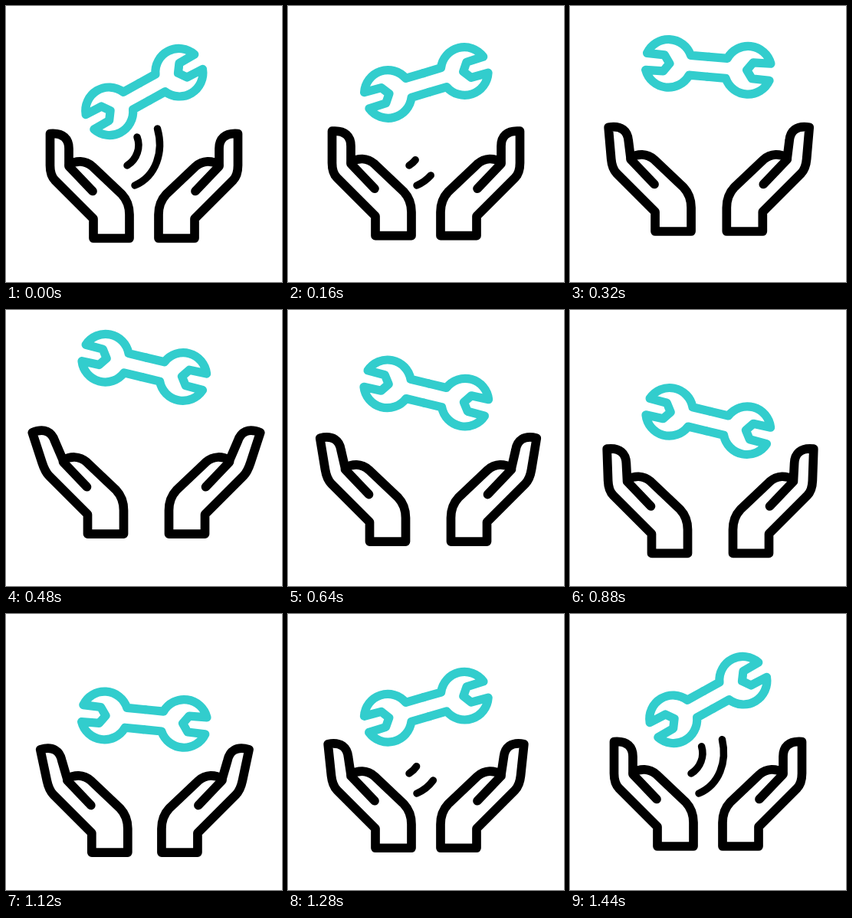
These frames come from a looping animation (360x360 px, 1.48 s). An HTML page:

```html
<!DOCTYPE html>
<html lang="en">
<head>
<meta charset="utf-8">
<title>Wrench and hands</title>
<style>
  html, body { margin: 0; width: 100%; height: 100%; overflow: hidden; background: #fff; }
  svg { display: block; width: 100%; height: 100%; fill: none; stroke: #000; stroke-width: 11.7; stroke-linecap: round; stroke-linejoin: round; }
  #wrench { stroke: #32cdcd; stroke-width: 11.2; }
  .swoosh { stroke-width: 9.5; }
</style>
</head>
<body>
<svg viewBox="0 0 360 360">
  <defs>
    <g id="hand">
      <path id="outline"/>
      <path d="M82 209L113 241.500"/>
    </g>
    <path id="half" d="M0-13H24A30.700 30.700 0 0 1 81-11L58-10.500 50.500 0 58 10.500 81 11A30.700 30.700 0 0 1 24 13H0"/>
  </defs>
  <use id="left" href="#hand"/>
  <use id="right" href="#hand"/>
  <path class="swoosh" pathLength="1" d="M158 208C171 200 176 184 171 171"/>
  <path class="swoosh" pathLength="1" d="M168 234C196 222 206 190 197.500 160"/>
  <g id="wrench">
    <use href="#half"/>
    <use href="#half" transform="rotate(180)"/>
  </g>
</svg>
<script>
const LOOP = 1480, STEP = 40;
const $ = id => document.getElementById(id);
const swooshes = document.querySelectorAll('.swoosh');

// Eased progress from 0 to 1 between two times.
function ease(t, from, to) {
  const u = Math.min(1, Math.max(0, (t - from) / (to - from)));
  return u * u * (3 - 2 * u);
}

// Hand outline; the finger turns about its knuckle by the given angle.
function outline(degrees) {
  const a = degrees * Math.PI / 180, cos = Math.cos(a), sin = Math.sin(a);
  const turn = (x, y) => {
    const dx = x - 63, dy = y - 218;
    return `${63 + dx * cos + dy * sin} ${218 + dy * cos - dx * sin} `;
  };
  return 'M' + turn(57.5, 166.5)
    + 'C' + turn(75, 165) + turn(82, 174) + turn(82, 186)
    + 'L82 207C91 201.5 103 200.5 113 209.5L151 245.5C158 253 161 262 161 272V303H114V277.5L64 227.5'
    + 'C59 222.5 ' + turn(57.5, 216) + turn(57.5, 208) + 'Z';
}

function draw(t) {
  const wrenchY = 112 - 40 * ease(t, 0, 440) + 73 * ease(t, 430, 850) - 33 * ease(t, 980, 1440);
  const angle = -29 + 42.5 * (ease(t, 0, 450) - ease(t, 1000, 1440));
  const handY = -11 * ease(t, 0, 440) + 25.5 * ease(t, 460, 880) - 14.5 * ease(t, 860, 1420);
  const spread = ease(t, 200, 480) - ease(t, 940, 1220);
  const bend = 19 * ease(t, 220, 520) - 17 * ease(t, 520, 740)
    + 10 * ease(t, 900, 1120) - 12 * ease(t, 1120, 1440);
  const trail = 1 - ease(t, 0, 240) + ease(t, 1160, LOOP);

  $('outline').setAttribute('d', outline(bend));
  $('left').setAttribute('transform', `translate(${-7.5 * spread} ${handY})`);
  $('right').setAttribute('transform', `translate(${360 + 13.5 * spread} ${handY}) scale(-1 1)`);
  $('wrench').setAttribute('transform', `translate(180.3 ${wrenchY}) rotate(${angle})`);
  for (const path of swooshes) {
    path.style.strokeDasharray = trail < 1 ? `${trail} 2` : 'none';
    path.style.visibility = trail > 0.01 ? 'visible' : 'hidden';
  }
}

function tick() {
  const t = performance.now() % LOOP;
  draw(Math.floor(t / STEP) * STEP);
  requestAnimationFrame(tick);
}
tick();
</script>
</body>
</html>
```
